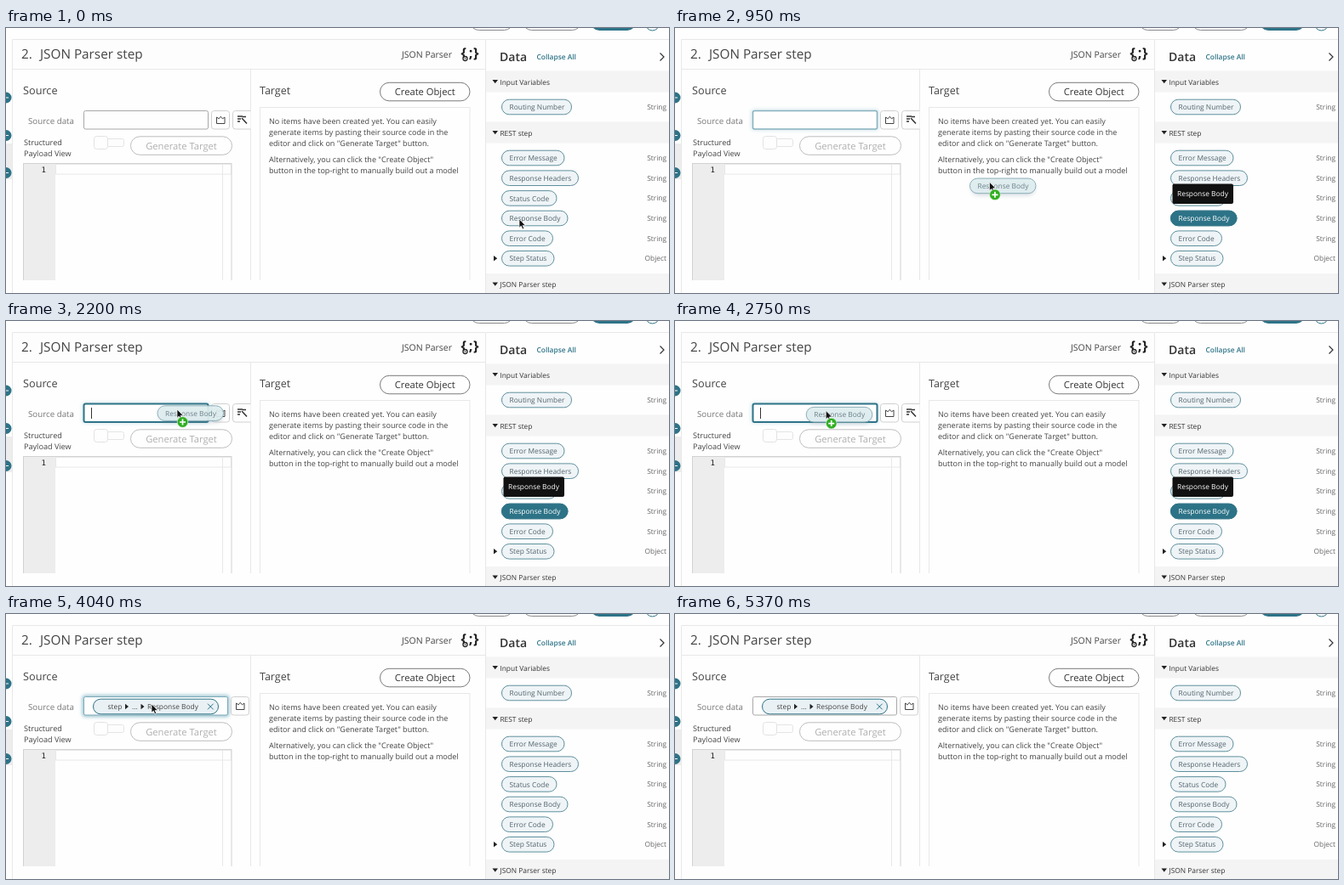
An HTML page for the animation above (5.41 s loop, 779 px wide and 312 px high).

```html
<!DOCTYPE html>
<html lang="en">
<head>
<meta charset="utf-8">
<title>Drag a data pill into a field</title>
<style>
  html, body { margin: 0; width: 100%; height: 100%; overflow: hidden; background: #fefefe; }
  svg { display: block; width: 779px; height: 312px; }
  text { font-family: "Open Sans", sans-serif; text-rendering: geometricPrecision; white-space: pre; }
  .soft { stroke: #e8e8e8; fill: none; }
</style>
</head>
<body>
<svg id="stage" viewBox="0 0 779 312" xmlns="http://www.w3.org/2000/svg">
  <defs>
    <filter id="glow" x="-20%" y="-60%" width="140%" height="220%"><feGaussianBlur stdDeviation="2"/></filter>
    <clipPath id="body"><rect width="563" height="297"/></clipPath>
    <clipPath id="sourceClip"><rect x="8" y="49" width="279.5" height="248"/></clipPath>
  </defs>
</svg>
<script>
const NS = "http://www.w3.org/2000/svg";
const TEAL = "#2d7387", PILL = "#eff4f7", EDGE = "#5f909d", INK = "#444", PLAIN = "#a8a8a8";
const LOOP = 5410;
const stage = document.getElementById("stage");

function add(parent, tag, attrs = {}, content) {
  const node = document.createElementNS(NS, tag);
  for (const key in attrs) node.setAttribute(key, attrs[key]);
  if (content !== undefined) node.textContent = content;
  parent.appendChild(node);
  return node;
}
const group = (parent, attrs) => add(parent, "g", attrs);
const rect = (parent, x, y, width, height, attrs) => add(parent, "rect", { x, y, width, height, ...attrs });
const path = (parent, d, attrs) => add(parent, "path", { d, ...attrs });
const circle = (parent, cx, cy, r, attrs) => add(parent, "circle", { cx, cy, r, ...attrs });
const label = (parent, x, y, size, content, attrs) =>
  add(parent, "text", { x, y, "font-size": size, fill: INK, ...attrs }, content);

// Rounded capsule with its text, centred on cy
function pill(parent, x, cy, width, content, { fill = PILL, stroke = EDGE, ink = "#52646c" } = {}) {
  const node = group(parent);
  rect(node, x, cy - 8.8, width, 17.6, { rx: 8.8, fill, stroke });
  label(node, x + 9, cy + 3.1, 8.4, content, { fill: ink });
  return node;
}

function button(parent, x, y, width, content, stroke, ink) {
  rect(parent, x, y, width, 21.5, { rx: 10.7, fill: "#fefefe", stroke });
  label(parent, x + width / 2, y + 14.8, 11.2, content, { "text-anchor": "middle", fill: ink });
}

function crownButton(parent, x) {
  rect(parent, x, 97.5, 21, 21.5, { rx: 3, fill: "#fefefe", stroke: "#d0d0d0" });
  path(parent, `M${x + 6} 105v7.5h9.5v-7.5l-2.6 1.8-2.1-2.6-2.1 2.6z`, { fill: "none", stroke: INK });
}

function drawTopAndRail() {
  for (const [x, width] of [[545.5, 50], [607.5, 68]])
    rect(stage, x, -18, width, 20.5, { rx: 10, fill: "none", stroke: "#888" });
  rect(stage, 687, -18, 53, 21, { rx: 10, fill: TEAL });
  circle(stage, 759.5, -5, 8, { fill: "none", stroke: TEAL });
  rect(stage, 0, 136, 7, 42, { fill: "#ededed" });
  path(stage, "M7.5 312V13.5H563", { class: "soft" });
  for (const y of [82, 126.5, 170.5]) {
    circle(stage, 0, y, 6.5, { fill: TEAL });
    path(stage, `M0 ${y}h3`, { stroke: "#fff" });
  }
}

function drawHeader() {
  rect(stage, 8, 14, 555, 34, { fill: "#fdfdfd" });
  path(stage, "M8 48.5H563M287.5 48V297", { class: "soft" });
  label(stage, 18, 36.4, 15.3, "2.");
  label(stage, 40, 36.4, 15.3, "JSON Parser step");
  label(stage, 465, 34.8, 10.5, "JSON Parser");
  for (const [x, mark] of [[534.5, "{"], [543.8, ";"], [549, "}"]])
    label(stage, x, 35, 16.5, mark, { "font-weight": 700, fill: "#222" });
  circle(stage, 539.5, 36, 2.5, { fill: "#fdfdfd", stroke: "#222", "stroke-width": 1.3 });
  circle(stage, 539.5, 36, 0.8, { fill: "#222" });
}

function drawSource() {
  const pane = group(stage, { "clip-path": "url(#sourceClip)" });
  label(pane, 20, 78, 12.7, "Source");
  label(pane, 26, 112.5, 9.75, "Source data", { fill: "#777" });
  label(pane, 21, 138, 9.1, "Structured");
  label(pane, 21, 151, 9.1, "Payload View");
  rect(pane, 104, 130.5, 34.5, 9, { rx: 2, fill: "#fdfdfd", stroke: "#e4e4e4" });
  rect(pane, 103.5, 127.5, 16, 15, { rx: 3, fill: "#fefefe", stroke: "#e2e2e2" });
  button(pane, 146.5, 127.8, 119, "Generate Target", "#bdbdbd", "#b0b0b0");
  rect(pane, 21, 160, 37, 140, { fill: "#ededee" });
  rect(pane, 58.5, 160.5, 206, 11.5, { class: "soft" });
  path(pane, "M254.5 160V297", { class: "soft" });
  rect(pane, 20.5, 159.5, 244.5, 150, { fill: "none", stroke: "#d2d2d2" });
  label(pane, 41.5, 169.5, 9, "1", { style: "font-family:'DejaVu Sans Mono',monospace", fill: "#222" });
  return pane;
}

function drawTarget() {
  const pane = group(stage, { "clip-path": "url(#body)" });
  label(pane, 298, 77.7, 12.5, "Target");
  button(pane, 439.5, 64.3, 105.5, "Create Object", "#7a7a7a", "#333");
  rect(pane, 298.5, 93.5, 246.5, 220, { class: "soft" });
  [[113.2, "No items have been created yet. You can easily"],
   [126.3, "generate items by pasting their source code in the"],
   [139.3, "editor and click on \"Generate Target\" button."],
   [158.3, "Alternatively, you can click the \"Create Object\""],
   [171.3, "button in the top-right to manually build out a model"],
  ].forEach(([y, line]) => label(pane, 309, y, 9.05, line));
}

function drawDataPanel() {
  rect(stage, 563, 4, 216, 308, { fill: "#fefefe" });
  path(stage, "M563.5 312V13.5H779", { class: "soft" });
  label(stage, 580, 39, 14, "Data", { "font-weight": 600, fill: "#333" });
  label(stage, 623.5, 37, 8.4, "Collapse All", { "font-weight": 600, fill: TEAL });
  path(stage, "M768.5 29.5l4.5 4.5-4.5 4.5", { fill: "none", stroke: "#333", "stroke-width": 1.2 });
  for (const [cy, title] of [[63, "Input Variables"], [123, "REST step"], [301.5, "JSON Parser step"]]) {
    rect(stage, 564, cy - 12.5, 215, 25, { fill: "#f4f4f4" });
    path(stage, `M571.5 ${cy - 2}h6.5l-3.25 4.2z`, { fill: "#222" });
    label(stage, 580.4, cy + 3.5, 8.4, title, { fill: "#333" });
  }
  for (const [cy, width, name, type = "String"] of [
    [93, 82, "Routing Number"], [153, 73.5, "Error Message"], [176.7, 90, "Response Headers"],
    [200.4, 64.5, "Status Code"], [224, 77.5, "Response Body"], [247.7, 60, "Error Code"],
    [271.3, 61.5, "Step Status", "Object"],
  ]) {
    pill(stage, 582.5, cy, width, name);
    label(stage, 776, cy + 3, 8.4, type, { "text-anchor": "end", fill: "#666" });
  }
  path(stage, "M573 268l4.2 3.2-4.2 3.2z", { fill: "#222" });
}

function drawEmptyField(pane) {
  const node = group(pane);
  const glow = rect(node, 91, 97.5, 147, 21.5, { rx: 2, fill: "none", stroke: "#b5d4dd", "stroke-width": 2, filter: "url(#glow)" });
  const box = rect(node, 91.5, 97.5, 146, 21.5, { rx: 2, fill: "#fefefe" });
  crownButton(node, 241.5);
  rect(node, 266.5, 97.5, 24, 21.5, { rx: 3, fill: "#fefefe", stroke: "#d0d0d0" });
  path(node, "M272 104h6M272 107h4M272 110h3M277 106l6 6.5M278 104.5l4 0", { stroke: "#333", "stroke-width": 1.5 });
  const caret = path(node, "M100.5 102v13", { stroke: "#333" });
  return { node, glow, box, caret };
}

function drawFilledField(pane) {
  const node = group(pane);
  const glow = rect(node, 91.5, 97.5, 169, 21.5, { rx: 2, fill: "none", stroke: "#6faabb", "stroke-width": 3, filter: "url(#glow)" });
  const box = rect(node, 91.5, 97.5, 169, 21.5, { rx: 2, fill: "#fefefe" });
  crownButton(node, 264.5);
  rect(node, 102.5, 100.2, 147, 17.6, { rx: 8.8, fill: "#e9f1f5", stroke: TEAL });
  path(node, "M237 105.7l6.6 6.6m0-6.6l-6.6 6.6", { stroke: TEAL });
  const crumbs = group(node);
  label(crumbs, 119.5, 112, 8.4, "step");
  label(crumbs, 148, 112, 8.4, "...");
  label(crumbs, 166, 112, 8.4, "Response Body");
  for (const x of [140, 158.5]) path(crumbs, `M${x} 105.8l4 3.2-4 3.2z`, { fill: "#222" });
  const icon = path(node, "M224.5 106.8l-2 2.2 2 2.2m4-4.4l-1.8 4.4m4.2-4.4v4.4", { fill: "none", stroke: "#7595a5", "stroke-width": 0.9 });
  return { node, glow, box, crumbs, icon };
}

function drawDragged() {
  const node = group(stage);
  rect(node, -22, -1.5, 76, 17.6, { rx: 8.8, fill: "#789", opacity: 0.25, filter: "url(#glow)" });
  const ghost = group(node, { opacity: 0.92 });
  pill(ghost, -23, 4.6, 77.5, "Response Body", { fill: "#dfeef0", stroke: "#83a9b3", ink: "#647980" });
  return node;
}

function drawPointer() {
  const node = group(stage);
  path(node, "M0 0v10.2l2.3-2.1 1.6 3.7 1.8-.8-1.6-3.6h3.2z", { fill: "#111", stroke: "#fff", "stroke-width": 0.7 });
  const plus = group(node);
  circle(plus, 6.5, 15, 6.3, { fill: "#2fae20", stroke: "#e8f5e6", "stroke-width": 0.6 });
  path(plus, "M3 15h7M6.5 11.5v7", { stroke: "#fff", "stroke-width": 1.7 });
  return { node, plus };
}

drawTopAndRail();
drawHeader();
const sourcePane = drawSource();
const empty = drawEmptyField(sourcePane);
const filled = drawFilledField(sourcePane);
drawTarget();
drawDataPanel();
const dragging = pill(stage, 582.5, 224, 77.5, "Response Body", { fill: TEAL, stroke: TEAL, ink: "#fff" });
const hovered = pill(stage, 582.5, 224, 77.5, "Response Body", { fill: "#dceaee" });
const tooltip = group(stage);
rect(tooltip, 584.5, 183.5, 71.5, 23.5, { rx: 2, fill: "#111" });
label(tooltip, 590, 198.3, 8.4, "Response Body", { fill: "#fff" });
const dragged = drawDragged();
const pointer = drawPointer();

// Pointer route: time, x, y
const ROUTE = [
  [0, 603, 225], [370, 603, 225], [620, 525, 215], [900, 390, 189], [1290, 233, 130],
  [1500, 210, 111], [2040, 201, 104], [2300, 201, 104], [2870, 171, 106],
  [4160, 171, 106], [4500, 167, 136], [4850, 150, 230],
];
function pointerAt(t) {
  const next = ROUTE.findIndex(stop => stop[0] > t);
  if (next < 0) return ROUTE.at(-1).slice(1);
  const [t0, x0, y0] = ROUTE[next - 1], [t1, x1, y1] = ROUTE[next];
  const k = (t - t0) / (t1 - t0);
  return [x0 + (x1 - x0) * k, y0 + (y1 - y0) * k];
}

const show = (node, on) => node.setAttribute("display", on ? "inline" : "none");
function outline(box, color, width) {
  box.setAttribute("stroke", color);
  box.setAttribute("stroke-width", width);
}

function render(now) {
  const t = now % LOOP;
  const within = (from, to) => t >= from && t < to;
  const dropAt = 3040, isDrag = within(370, dropAt), isOver = within(1410, dropAt);
  const isFocused = within(dropAt, 4200), hasIcon = within(4200, 4750);

  show(empty.node, t < dropAt);
  show(empty.glow, isDrag);
  show(empty.caret, isOver);
  outline(empty.box, isOver ? TEAL : isDrag ? "#86b1be" : PLAIN, isOver ? 2 : isDrag ? 1.5 : 1);

  show(filled.node, t >= dropAt);
  show(filled.glow, isFocused);
  show(filled.icon, hasIcon);
  outline(filled.box, isFocused ? "#7aa9b7" : PLAIN, 1);
  filled.crumbs.setAttribute("transform", `translate(${hasIcon ? -6.3 : 0} 0)`);

  show(dragging, isDrag);
  show(hovered, within(120, 370) || within(dropAt, 3650));
  show(tooltip, within(200, 3650));

  const place = `translate(${pointerAt(t).join(" ")})`;
  dragged.setAttribute("transform", place);
  pointer.node.setAttribute("transform", place);
  show(dragged, isDrag);
  show(pointer.node, t < 4850);
  show(pointer.plus, within(450, 1000) || isOver);
}

const start = performance.now();
function tick() {
  render(performance.now() - start);
  requestAnimationFrame(tick);
}
tick();
</script>
</body>
</html>
```
